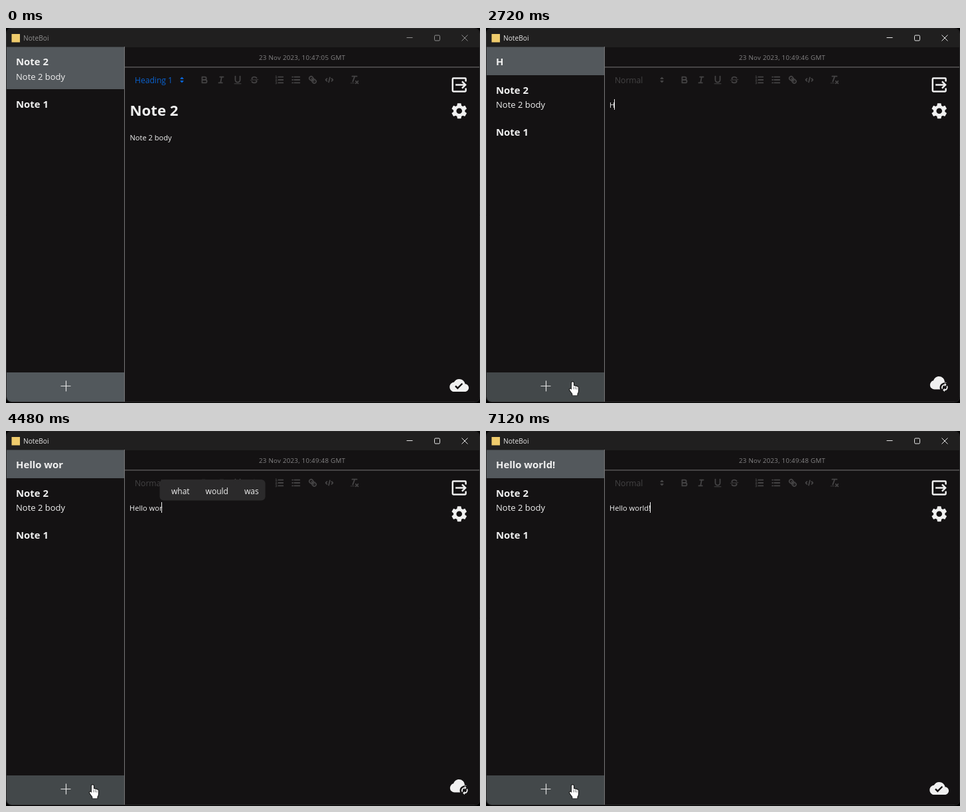
An HTML page with a canvas that plays this animation: 714 by 564 pixels, repeating every 7.2 s.

```html
<!DOCTYPE html>
<html lang="en">
<head>
<meta charset="utf-8">
<title>Notes</title>
<style>
  html, body { margin: 0; width: 100%; height: 100%; overflow: hidden; background: #000; }
  canvas { display: block; width: 714px; height: 564px; }
</style>
</head>
<body>
<canvas id="stage"></canvas>
<script>
const W = 714, H = 564, LOOP = 7200;
const canvas = document.getElementById('stage');
const ctx = canvas.getContext('2d');
const dpr = window.devicePixelRatio || 1;
canvas.width = W * dpr;
canvas.height = H * dpr;

const FONT = '"Open Sans", "Noto Sans", sans-serif';
const LIGHT = '#f0f0f0', TOOL = '#444344', BLUE = '#0a62d0';
const FOCUS = 1520, CREATE = 1760, CARET = 1820;
const SYNC = 2560, SYNCED = 5600;

// time, text, suggestions
const keys = [
  [CARET, ''],
  [2480, 'H'],
  [3040, 'He', ['He', 'Her', 'Here']],
  [3200, 'Hel', ['Help', 'Hello', 'Held']],
  [3360, 'Hell', ['Hello', 'Help', 'Helped']],
  [3600, 'Hello', ['Hello', 'Hellos']],
  [3760, 'Hello '],
  [4000, 'Hello w', ['was', 'with', 'we']],
  [4240, 'Hello wo', ['would', 'work', 'won']],
  [4400, 'Hello wor', ['what', 'would', 'was']],
  [4640, 'Hello worl', ['world', 'worlds']],
  [4800, 'Hello world', ['world', 'worlds']],
  [5040, 'Hello world!']
];
const clock = [[0, '47:05'], [CREATE, '49:45'], [2480, '49:46'], [3040, '49:47'], [4000, '49:48']];

const path = d => new Path2D(d);
const tools = [
  { x: 299, bold: path('M5 4H9.5A2.5 2.5 0 0 1 9.5 9H5ZM5 9H10.5A2.5 2.5 0 0 1 10.5 14H5Z') },
  { x: 324, bold: path('M7 4H13M5 14H11M8 14L10 4') },
  { x: 349, bold: path('M5 3V9a4 4 0 0 0 8 0V3'), fill: path('M3 15H15V16H3Z') },
  { x: 374, thin: path('M15.5 8.5L2.5 9.5'),
    fill: path('M9 8C6.5 7.8 6 7.5 6 6.5 6 5.8 7.3 5 9 5c1.6 0 2.8.7 3 1.3a1 1 0 0 0 1.9-.6C13.4 4.1 11.4 3 9 3 6.2 3 4 4.5 4 6.5a3.2 3.2 0 0 0 .5 1.8ZM9 10c2.5.2 3 .5 3 1.5 0 .7-1.3 1.5-3 1.5-1.6 0-2.8-.7-3-1.3a1 1 0 1 0-1.9.6C4.6 13.9 6.6 15 9 15c2.8 0 5-1.5 5-3.5a3.2 3.2 0 0 0-.5-1.8Z') },
  { x: 412, bold: path('M7 4H15M7 9H15M7 14H15'),
    thin: path('M2.5 2.5L3.5 2V5.5M2.3 5.5H4.7M2.4 8.2Q3.5 7 4.4 8L2.4 10.5H4.7M2.4 12.5H4.4L3.4 13.8Q5 14.2 4.2 15.3 3.4 16 2.3 15.4') },
  { x: 437, bold: path('M6 4H15M6 9H15M6 14H15M2.5 4H3.5M2.5 9H3.5M2.5 14H3.5') },
  { x: 462, bold: path('M7 7L11 11M8.9 4.6a3.5 3.5 0 0 1 .4 4.7A3.5 3.5 0 0 1 4.6 8.9C3.2 7.5 2 6.4 4.2 4.2S7.5 3.2 8.9 4.6ZM13.4 9.1a3.5 3.5 0 0 0-4.7-.4 3.5 3.5 0 0 0 .4 4.7c1.4 1.4 2.5 2.5 4.7.4S14.8 10.5 13.4 9.1Z') },
  { x: 487, bold: path('M5 7L3 9 5 11M13 7L15 9 13 11M10 5L8 13') },
  { x: 525, bold: path('M5 3H13M6 12L9.35 3M11 11L15 15M15 11L11 15'), fill: path('M2 14H9V15H2Z') }
];
const picker = path('M7 11L9 13 11 11ZM7 7L9 5 11 7Z');
const exitIcon = path('M5 3h14a2 2 0 0 1 2 2v3h-2V5H5v14h14v-3h2v3a2 2 0 0 1-2 2H5a2 2 0 0 1-2-2V5a2 2 0 0 1 2-2zM16.1 7.1L21 12 16.1 16.9 14.7 15.5 17.2 13H7.5V11H17.2L14.7 8.5z');
const gear = path('M19.14 12.94c.04-.3.06-.61.06-.94 0-.32-.02-.64-.07-.94l2.03-1.58c.18-.14.23-.41.12-.61l-1.92-3.32c-.12-.22-.37-.29-.59-.22l-2.39.96c-.5-.38-1.03-.7-1.62-.94l-.36-2.54c-.04-.24-.24-.41-.48-.41h-3.84c-.24 0-.43.17-.47.41l-.36 2.54c-.59.24-1.13.57-1.62.94l-2.39-.96c-.22-.08-.47 0-.59.22L2.74 8.87c-.12.21-.08.47.12.61l2.03 1.58c-.05.3-.09.63-.09.94s.02.64.07.94l-2.03 1.58c-.18.14-.23.41-.12.61l1.92 3.32c.12.22.37.29.59.22l2.39-.96c.5.38 1.03.7 1.62.94l.36 2.54c.05.24.24.41.48.41h3.84c.24 0 .44-.17.47-.41l.36-2.54c.59-.24 1.13-.56 1.62-.94l2.39.96c.22.08.47 0 .59-.22l1.92-3.32c.12-.22.07-.47-.12-.61zM12 15.6a3.6 3.6 0 1 1 0-7.2 3.6 3.6 0 0 1 0 7.2z');
const cloudDone = path('M19.35 10.04C18.67 6.59 15.64 4 12 4 9.11 4 6.6 5.64 5.35 8.04 2.34 8.36 0 10.91 0 14c0 3.31 2.69 6 6 6h13c2.76 0 5-2.24 5-5 0-2.64-2.05-4.78-4.65-4.96zM10 17l-3.5-3.5 1.41-1.41L10 14.17 15.18 9l1.41 1.41z');
const cloudSync = path('M13 18c.1.7.2 1.4.5 2h-7C5 20 3.7 19.5 2.6 18.4 1.5 17.4 1 16.1 1 14.6c0-1.3.4-2.5 1.2-3.5S4 9.4 5.25 9.15c.4-1.5 1.25-2.8 2.5-3.7S10.4 4 12 4c1.95 0 3.6.7 5 2C18.3 7.4 19 9 19 11c1.15.1 2.1.6 2.9 1.5l1 .6A6 6 0 0 0 13 18zM19 13.5V12l2.25 2.25L19 16.5V15a2.5 2.5 0 0 0-2.24 3.62l-1.09 1.09A4 4 0 0 1 19 13.5M19 21.5V23l-2.25-2.25L19 18.5V20a2.5 2.5 0 0 0 2.24-3.62l1.09-1.09A4 4 0 0 1 19 21.5');
const hand = path('M-3.2 4V-7.2a1.6 1.6 0 0 1 3.2 0V-2.2Q1.6-3.4 2.8-1.6 4.5-2.6 5.3-.8 7-1.6 7.4.5V5.5Q7.4 8 5.8 10V12.5H-1.8V10.2L-6 4.6Q-7 2.4-5.2 2-4.2 2-3.2 4Z');
const arrow = path('M0 0V16L3.7 12.5 6.2 18.3 8.8 17.2 6.3 11.5H11.5Z');

function latest(list, t) {
  let found = null;
  for (const row of list) if (t >= row[0]) found = row;
  return found;
}

function box(x, y, w, h, color) {
  ctx.fillStyle = color;
  ctx.fillRect(x, y, w, h);
}

function text(str, x, y, size, color = LIGHT, weight = 400) {
  ctx.font = `${weight} ${size}px ${FONT}`;
  ctx.fillStyle = color;
  ctx.fillText(str, x, y);
  return ctx.measureText(str).width;
}

function line(d, color, width) {
  ctx.strokeStyle = color;
  ctx.lineWidth = width;
  ctx.stroke(path(d));
}

function at(x, y, scale, origin, draw) {
  ctx.save();
  ctx.translate(x, y);
  ctx.scale(scale, scale);
  ctx.translate(-origin, -origin);
  draw();
  ctx.restore();
}

function icon(shape, x, y, scale = 1.2) {
  ctx.fillStyle = LIGHT;
  at(x, y, scale, 12, () => ctx.fill(shape, 'evenodd'));
}

function drawTitleBar(active) {
  const color = active ? '#e6e6e6' : '#8f8f8f';
  box(1, 1, 712, 28, '#201f1f');
  box(8.5, 9, 12.5, 12.5, '#efcb6c');
  text('NoteBoi', 26, 19, 10.2, color);
  line('M603.5 14.5H612.5M686.5 10.5L695.5 19.5M695.5 10.5L686.5 19.5', color, 1);
  ctx.beginPath();
  ctx.roundRect(645.5, 11, 8, 8, 1.5);
  ctx.stroke();
}

function drawSidebar(t, typed) {
  const notes = [['Note 2', 'Note 2 body'], ['Note 1']];
  if (t >= CREATE) notes.unshift([typed]);
  let top = 28.5;
  notes.forEach(([title, body], i) => {
    const h = 20 + (title ? 22.5 : 0) + (body ? 21 : 0);
    if (!i) box(1, top, 177, h, '#53585c');
    text(title, 15, top + 27.5, 14.9, LIGHT, 700);
    if (body) text(body, 15, top + 49.2, 13);
    top += h;
  });
}

function drawAddButton(hover) {
  const mix = (a, b) => Math.round(a + (b - a) * hover);
  box(1, 518, 177, 44, `rgb(${mix(82, 67)},${mix(88, 72)},${mix(92, 74)})`);
  line('M82.5 538.5H97.5M90.5 530.5V546.5', '#e2e2e2', 1.2);
}

function drawToolbar(heading) {
  const color = heading ? BLUE : TOOL;
  text(heading ? 'Heading 1' : 'Normal', 194, 83, 12.1, color, heading ? 500 : 400);
  ctx.lineJoin = ctx.lineCap = 'round';
  at(265, 78, 0.89, 9, () => {
    ctx.strokeStyle = ctx.fillStyle = color;
    ctx.lineWidth = 1.6;
    ctx.stroke(picker);
    ctx.fill(picker);
  });
  ctx.strokeStyle = ctx.fillStyle = TOOL;
  for (const tool of tools) {
    at(tool.x, 78, 0.89, 9, () => {
      ctx.lineWidth = 2;
      if (tool.bold) ctx.stroke(tool.bold);
      ctx.lineWidth = 1;
      if (tool.thin) ctx.stroke(tool.thin);
      if (tool.fill) ctx.fill(tool.fill);
    });
  }
  ctx.lineJoin = 'miter';
  ctx.lineCap = 'butt';
}

function drawPopup(words, left) {
  ctx.font = `500 12px ${FONT}`;
  const widths = words.map(w => ctx.measureText(w).width);
  const total = widths.reduce((a, b) => a + b, 27.5 + 24 * (words.length - 1));
  ctx.fillStyle = '#2b2a2b';
  ctx.beginPath();
  ctx.roundRect(left, 73, total, 31.5, 6);
  ctx.fill();
  let x = left + 17.5;
  words.forEach((word, i) => {
    text(word, x, 95, 12, LIGHT, 500);
    x += widths[i] + 24;
  });
}

function drawEditor(t, key) {
  const minutes = latest(clock, t)[1];
  ctx.letterSpacing = '0.25px';
  text(`23 Nov 2023, 10:${minutes} GMT`, 381, 47.5, 9.75, '#858485');
  ctx.letterSpacing = '0px';
  drawToolbar(t < CREATE);
  if (t < CREATE) {
    text('Note 2', 186.5, 132, 22.2, LIGHT, 700);
    text('Note 2 body', 186.5, 169, 11.1, LIGHT, 500);
  }
  if (!key) return;
  const end = 186 + text(key[1], 186, 119.5, 11.1, LIGHT, 500);
  if (Math.floor((t - key[0]) / 500) % 2 === 0) box(Math.floor(end - 0.5), 107, 1, 16, LIGHT);
  if (key[2]) drawPopup(key[2], end - 4);
}

function drawCursor(t, x, y, over) {
  if (t < 480) return;
  ctx.save();
  ctx.translate(x, y);
  ctx.scale(0.95, 0.95);
  const shape = over ? hand : arrow;
  ctx.lineJoin = 'round';
  ctx.lineWidth = 2;
  ctx.strokeStyle = '#111';
  ctx.stroke(shape);
  ctx.fillStyle = '#fff';
  ctx.fill(shape);
  if (over) line('M0-1V3M2.8-1V3M5.3 0V3.5', '#333', 0.7);
  ctx.restore();
}

function draw(t) {
  const key = latest(keys, t);
  const p = Math.min(1, Math.max(0, (t - 480) / 640));
  const ease = 1 - (1 - p) ** 3;
  const x = 667 - 535 * ease, y = 8 + 532.5 * ease;
  const over = x < 178 && y > 518;
  const hover = Math.min(1, Math.max(0, (t - 900) / 200));

  ctx.setTransform(dpr, 0, 0, dpr, 0, 0);
  box(0, 0, W, H, '#000');
  ctx.save();
  ctx.beginPath();
  ctx.roundRect(1, 1, 712, 561, 7);
  ctx.clip();
  box(0, 0, W, H, '#141213');
  drawTitleBar(t >= FOCUS);
  drawSidebar(t, key ? key[1] : '');
  drawAddButton(hover);
  box(178, 28, 1, 534, '#777677');
  box(179, 58.4, 534, 1, '#777677');
  drawEditor(t, key);
  icon(exitIcon, 682.7, 85.5, 1.24);
  icon(gear, 682.7, 124.8);
  if (t >= SYNC && t < SYNCED) icon(cloudSync, 682.3, 533.8, 1.22);
  else icon(cloudDone, 682.7, 537.5);
  ctx.restore();
  ctx.strokeStyle = '#2a292a';
  ctx.lineWidth = 1;
  ctx.beginPath();
  ctx.roundRect(0.5, 0.5, 713, 562, 7);
  ctx.stroke();
  drawCursor(t, x, y, over);
}

const start = performance.now();
function tick() {
  draw((performance.now() - start) % LOOP);
  requestAnimationFrame(tick);
}
tick();
</script>
</body>
</html>
```
